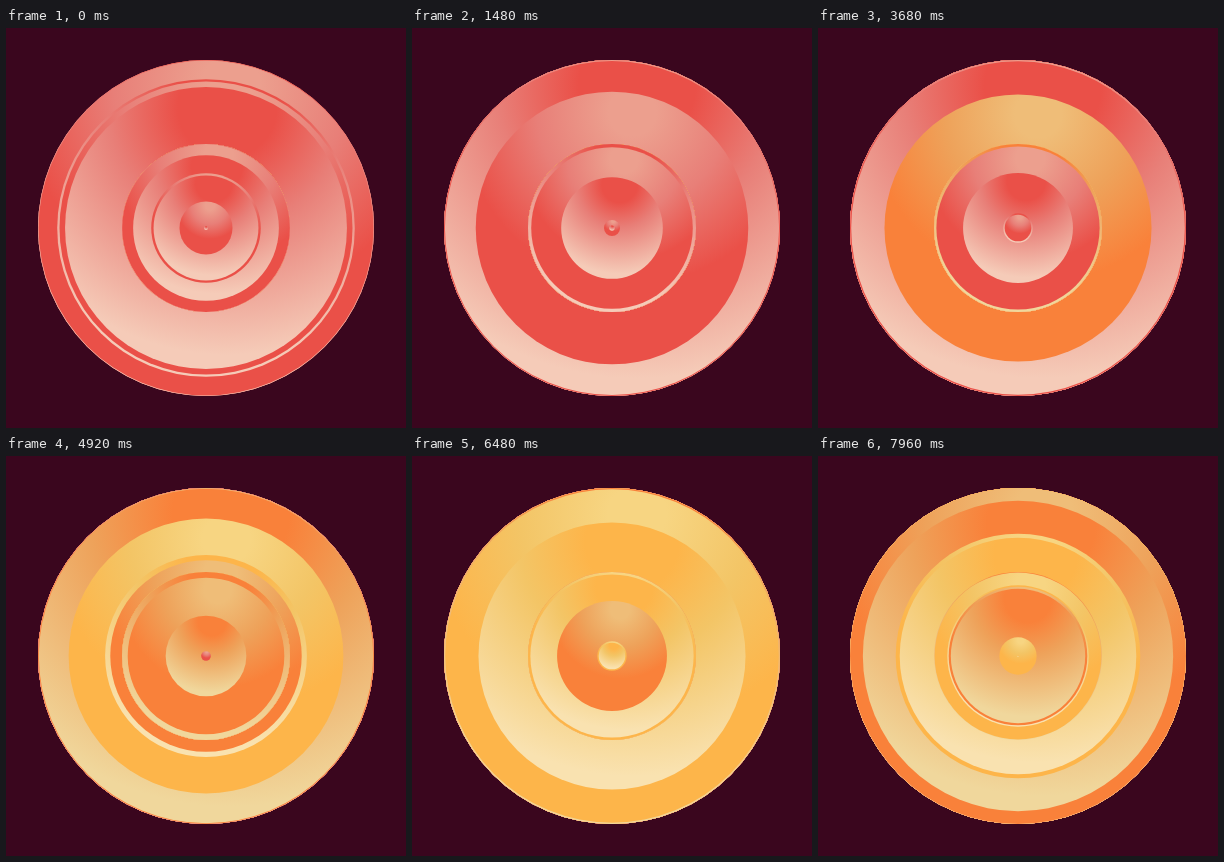
Animation of 400x400 px, one loop 8000 ms. Source, as an HTML page with a canvas:

```html
<!DOCTYPE html>
<html lang="en">
<head>
<meta charset="utf-8">
<title>Pulsing discs</title>
<style>
  html, body { margin: 0; width: 100%; height: 100%; overflow: hidden; background: #3a061e; }
  canvas { display: block; width: 400px; height: 400px; }
</style>
</head>
<body>
<canvas id="stage" width="400" height="400"></canvas>
<script>
const ctx = document.getElementById('stage').getContext('2d');
const LOOP = 8000, FRAME = 40;
const CENTER = 200, OUTER = 168, INNER = 84;
const FIRST = -7, LAST = 21;

// Every cycle starts five discs at an even beat and a close pair of slow ones.
const BEAT = 560, CYCLE = 5 * BEAT;
const BEAT_SPAN = 4 * BEAT, SLOW_SPAN = 4300;

const PALETTES = [
  { strong: '#ea5048', middle: '#e87f78', sheen: '#ec9f8e', pale: '#f5cbb8' },
  { strong: '#f9813a', middle: '#eea25a', sheen: '#efbd78', pale: '#f0d79c' },
  { strong: '#fdb54a', middle: '#f3c566', sheen: '#f7d582', pale: '#f9e2b0' }
];

// Delays say when a disc is halfway; sway bends the shared clock once per beat.
const GROWING = { delay: 120, slowDelay: 1990, sway: 90, firstWarm: 8 };
const SHRINKING = { delay: 985, slowDelay: 3020, sway: -25, firstWarm: 9 };

const clamp = x => Math.min(1, Math.max(0, x));
const ease = x => x < .5 ? 4 * x ** 3 : 1 - 4 * (1 - x) ** 3;

function progress(stream, n, time) {
  const cycle = Math.floor(n / 7), slot = n - cycle * 7;
  const local = time - cycle * CYCLE;
  if (slot === 4 || slot === 5) {
    const middle = stream.slowDelay + (slot - 4.5) * 50;
    return ease(clamp(.5 + (local - middle) / SLOW_SPAN));
  }
  const beat = slot < 4 ? slot : 4;
  const sway = stream.sway * Math.cos(2 * Math.PI * (time - 20) / BEAT);
  const middle = beat * BEAT + stream.delay + sway;
  return ease(clamp(.5 + (local - middle) / BEAT_SPAN));
}

// Red at first, then pairs of orange and amber in turn.
function paletteOf(n, firstWarm) {
  const step = n - firstWarm;
  return PALETTES[step < 0 ? 0 : 1 + (step >> 1 & 1)];
}

function disc(radius, n, stream) {
  const { strong, middle, sheen, pale } = paletteOf(n, stream.firstWarm);
  const x = CENTER + radius * .15, y = CENTER - radius * .85;
  const reach = 1.75;
  const shade = ctx.createRadialGradient(x, y, 0, x, y, radius * reach);
  if (n % 2 === 0) {
    shade.addColorStop(.1, sheen);
    shade.addColorStop(.4, middle);
    shade.addColorStop(.72, strong);
  } else {
    shade.addColorStop(.2, strong);
    shade.addColorStop(.48, middle);
    shade.addColorStop(1, pale);
  }
  ctx.fillStyle = shade;
  ctx.beginPath();
  ctx.arc(CENTER, CENTER, radius, 0, Math.PI * 2);
  ctx.fill();
}

function draw() {
  const time = Math.floor(performance.now() % LOOP / FRAME) * FRAME;
  ctx.fillStyle = '#3a061e';
  ctx.fillRect(0, 0, 400, 400);
  for (let n = FIRST; n <= LAST; n++) {
    const radius = OUTER * progress(GROWING, n, time);
    if (radius > INNER) disc(radius, n, GROWING);
  }
  for (let n = LAST; n >= FIRST; n--) {
    const radius = INNER * (1 - progress(SHRINKING, n, time));
    if (radius > .3) disc(radius, n, SHRINKING);
  }
  requestAnimationFrame(draw);
}
draw();
</script>
</body>
</html>
```
